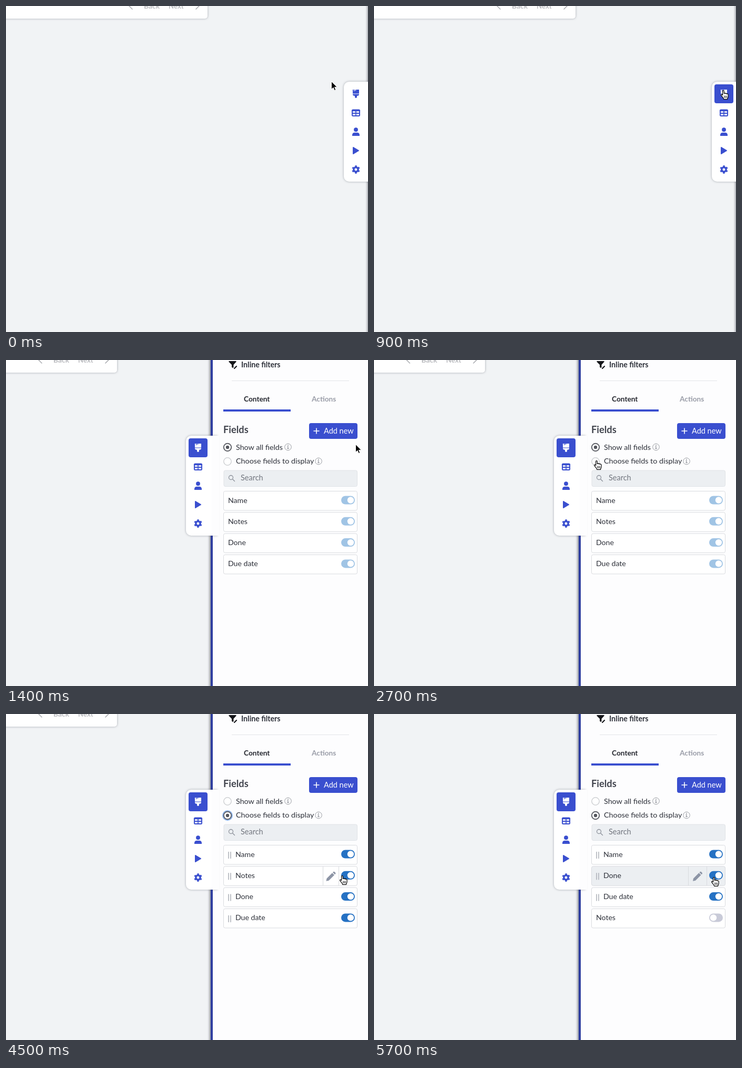
These frames come from a looping animation (688x620 px, 5.8 s). An HTML page:

```html
<!DOCTYPE html>
<html lang="en">
<head>
<meta charset="utf-8">
<title>Choose fields</title>
<style>
html, body { margin: 0; width: 100%; height: 100%; overflow: hidden; background: #f1f3f5; }
svg { display: block; font: 14.2px Lato, "Open Sans", sans-serif; }
.bold { font-weight: 700; }
.panel { filter: drop-shadow(-2px 0 2px rgba(40, 45, 60, .55)); }
.card { filter: drop-shadow(0 0 2px rgba(50, 55, 70, .4)); }
.line { fill: none; stroke-linecap: round; stroke-linejoin: round; }
</style>
</head>
<body>
<svg id="stage" width="688" height="620" viewBox="0 0 688 620"></svg>
<script>
const BLUE = '#3a4fcf', INK = '#2d3039', LOOP = 5800, STEP = 100;
const stage = document.getElementById('stage');

// Value at time t along [time, value] keys
function track(t, keys, ease = k => k) {
  const i = keys.findIndex(k => k[0] > t);
  if (i < 0) return keys[keys.length - 1][1];
  if (!i) return keys[0][1];
  const [t0, a] = keys[i - 1], [t1, b] = keys[i];
  return a + (b - a) * ease((t - t0) / (t1 - t0));
}
const smooth = k => k * k * (3 - 2 * k);
const shift = (x, y, body, attrs = '') => `<g transform="translate(${x} ${y})" ${attrs}>${body}</g>`;
const box = (x, y, w, h, fill, r = 0, attrs = '') =>
  `<rect x="${x}" y="${y}" width="${w}" height="${h}" rx="${r}" fill="${fill}" ${attrs}/>`;
const disc = (x, y, r, fill, attrs = '') => `<circle cx="${x}" cy="${y}" r="${r}" fill="${fill}" ${attrs}/>`;
const text = (x, y, s, fill = INK, size = 14.2, cls = '') =>
  `<text x="${x}" y="${y}" fill="${fill}" font-size="${size}" class="${cls}">${s}</text>`;
const line = (d, color, w) => `<path class="line" d="${d}" stroke="${color}" stroke-width="${w}"/>`;
const shape = (d, fill, attrs = '') => `<path d="${d}" fill="${fill}" ${attrs}/>`;

function header(t) {
  if (t >= 5200) return '';
  const x = track(t, [[1000, 0], [1100, -28], [1200, -28], [1300, -172]]);
  const gray = '#bcbdc1';
  return shift(x, 0,
    box(-20, -20, 403, 44, '#fff', 5, 'class="card"') +
    line('M240 -6L234 0L240 6M361 -6L367 0L361 6', '#a3a5aa', 1.4) +
    text(262, 4.5, 'Back', gray, 13.9, 'bold') + text(309, 4.5, 'Next', gray, 13.2, 'bold'));
}

function radio(y, on, focus) {
  return (focus ? disc(421, y, 10, '#8db5ec') : '') +
    disc(421, y, 7.2, '#fff', `stroke="${on ? '#62646b' : '#cfd1d4'}" stroke-width="${on ? 2 : 1.5}"`) +
    (on ? disc(421, y, 3.2, '#55575e') : '');
}

const info = (x, y) => disc(x, y, 6.3, 'none', 'stroke="#9a9da3"') +
  line(`M${x - 1} ${y - .6}h1v3.6m-1.5 0h3`, '#8b8e95', 1.1) + disc(x, y - 3, .9, '#8b8e95');

const toggle = (y, fill, on) => box(637, y - 8, 26, 16, fill, 8) + disc(on ? 655 : 645, y, 6.2, '#fff');

function pencil(x, y) {
  return shift(x, y, shape('M-9 9l1-5L2.500 -6.500l4 4L-4 8zM3.500 -7.500l1.200-1.200q1-.8 2 0l2 2q.8 1 0 2L7.500 -3.500z', '#8d95a6'));
}

function row(i, name, chosen, state, hoverWidth, filled) {
  const y = 249.5 + 40.3 * i, mid = y + 17;
  const fill = state === 'off' ? '#c8cad8' : chosen ? '#2571c3' : '#a0c4e5';
  const grip = chosen && !(state === 'off' && i === 3);
  let s = box(413.5, y, 254, 36.5, filled ? '#eceff2' : '#fff', 3, 'stroke="#d9dbdf"');
  if (grip) s += line(`M423 ${mid - 4}v12M427 ${mid - 4}v12`, '#abaeb6', 1.5);
  s += text(grip ? 436 : 422, mid + 5, name, INK, 14.1);
  if (hoverWidth) {
    s += line(`M${632.5 - hoverWidth} ${y + .5}v35.5M632.5 ${y + .5}v35.5`, '#d9dbdf', 1) +
      pencil(632.5 - hoverWidth / 2, mid + 2);
  }
  return s + toggle(mid, fill, state !== 'off');
}

function panel(t) {
  const picked = t >= 2900, chosen = t >= 3000, sorted = t >= 5200;
  const names = sorted ? ['Name', 'Done', 'Due date', 'Notes'] : ['Name', 'Notes', 'Done', 'Due date'];
  const hoverWidth = track(t, [[4300, 0], [4400, 15], [4500, 30], [4600, 35]]);
  const rows = names.map((name, i) =>
    row(i, name, chosen, name === 'Notes' && t >= 5000 ? 'off' : 'on', i === 1 ? hoverWidth : 0, i === 1 && t >= 4600));
  return box(389, -20, 340, 660, '#2f3ea0', 0, 'class="panel"') + box(393, 0, 336, 620, '#fdfdfe') +
    shape('M423.500 2h14v1.500l-5 5.500v7l-3.500-2.500v-4.500l-5.500-5.500z', '#15161a') +
    line('M433 16.500l5-5', '#fdfdfe', 4.5) + line('M434 16l4-4', '#15161a', 2.2) +
    text(447, 14.3, 'Inline filters', INK, 14.2, 'bold') +
    box(429, 39, 223, 1, '#e4e5e8') +
    text(452, 79.3, 'Content', '#24262e', 13.7, 'bold') + text(581, 79.3, 'Actions', '#9a9da8', 13.7, 'bold') +
    box(413, 94, 128, 4, BLUE) +
    text(413, 139.2, 'Fields', '#42454e', 18.3, 'bold') +
    box(576, 120, 92, 30, BLUE, 4) + line('M585 135h10M590 130v10', '#fff', 1.6) +
    text(604, 139.6, 'Add new', '#fff', 14.5) +
    radio(166, !picked, false) + text(437, 170.5, 'Show all fields', INK, 14.3) + info(536, 165.5) +
    radio(193, picked, picked && t < 5000) + text(437, 197.4, 'Choose fields to display', INK, 14.3) + info(594, 192.5) +
    box(414, 210, 253.500, 30.5, '#eceff2', 3, 'stroke="#e0e3e7"') +
    disc(427.5, 223.5, 4, 'none', 'stroke="#8d929b" stroke-width="1.3"') + line('M430.500 226.500l4 4', '#8d929b', 1.4) +
    text(446, 229.4, 'Search', '#72767f', 14.5) +
    rows.join('');
}

function menu(t) {
  const active = t >= 800, hover = t >= 500 && !active, brush = active ? '#fff' : BLUE;
  return shape('M402 144H352a10 10 0 0 0-10 10V324a10 10 0 0 0 10 10H402z', '#fff', 'class="card"') +
    box(391, 144, 14, 190, '#fdfdfe') +
    (active ? box(347, 149, 36, 36, BLUE, 4) : hover ? box(347, 149, 36, 36, '#d2daf1', 4) : '') +
    shape('M359 159h2v3h1.300v-3h1.500v2.300h1.300v-2.300h5.900v7.500h-12zM359 167.500h12v.8q0 2.400-2.500 2.400h-1.500v2.300a2 2 0 0 1-4 0v-2.300h-1.500q-2.500 0-2.500-2.400z', brush) +
    box(358, 197.5, 14, 11.5, 'none', 1.5, `stroke="${BLUE}" stroke-width="2"`) +
    line('M358 199h14', BLUE, 2.5) + line('M358 204h14M365 199v10', BLUE, 1.8) +
    disc(365, 235.2, 3.9, BLUE) +
    shape('M358 247v-1.500q0-4.800 4.800-4.800h4.400q4.800 0 4.800 4.800v1.500z', BLUE) +
    shape('M360 269l10 6-10 6z', BLUE, `stroke="${BLUE}" stroke-width="2" stroke-linejoin="round"`) +
    disc(365, 311, 4.2, 'none', `stroke="${BLUE}" stroke-width="3.400"`) +
    disc(365, 311, 6.4, 'none', `stroke="${BLUE}" stroke-width="2.600" pathLength="12" stroke-dasharray="1 1" stroke-dashoffset=".5" transform="rotate(30 365 311)"`);
}

function tooltip(t) {
  if (t < 500 || t >= 800) return '';
  return shift(0, 0, box(544, 151, 95, 31, '#5978d8', 3) + text(557, 170.3, 'Edit layout', '#eef1fb', 14.7),
    `opacity="${t < 600 ? .6 : 1}"`);
}

function cursor(t) {
  const x = track(t, [[0, 618], [500, 664], [1900, 664], [2500, 423], [3900, 423], [4500, 639], [4600, 646]], smooth);
  const y = track(t, [[0, 143], [500, 160], [1900, 160], [2500, 191], [3900, 191], [4500, 307], [4600, 310]], smooth);
  const hand = t >= 400 && t < 1300 || t >= 2400 && t < 4100 || t >= 4500;
  return shift(x, y, hand
    ? shape('M-1.400 9.500V2c0-1.900 2.700-1.900 2.700 0V6.500c.3-1.300 2.600-1.200 2.700.3c.4-1.100 2.400-.9 2.500.6c.5-.9 2.600-.6 2.600 1V12c0 2-1.300 2.900-1.500 5.300H.8C.5 15.200-1.600 13.600-4.200 9.900C-5 8.500-3.300 7.400-2.300 8.500z',
        '#fff', 'stroke="#000" stroke-width="1.200" stroke-linejoin="round"') +
      line('M1.800 11v3.500M4 11v3.500M6.200 11v3.500', '#000', .9)
    : shape('M.5 .5V15.500l3.500-3.300 2.300 5.300 2.500-1.100-2.300-5.100h4.700z', '#000', 'stroke="#fff" stroke-width="1"'));
}

let shown = -1;
function draw(now) {
  const t = Math.floor(now % LOOP / STEP) * STEP;
  if (t !== shown) {
    shown = t;
    const slide = track(t, [[800, 300], [900, 300], [1100, 98.5], [1200, 0]]);
    stage.innerHTML = header(t) + shift(slide, 0, panel(t) + menu(t)) + tooltip(t) + cursor(t);
  }
  requestAnimationFrame(draw);
}
draw(performance.now());
</script>
</body>
</html>
```
